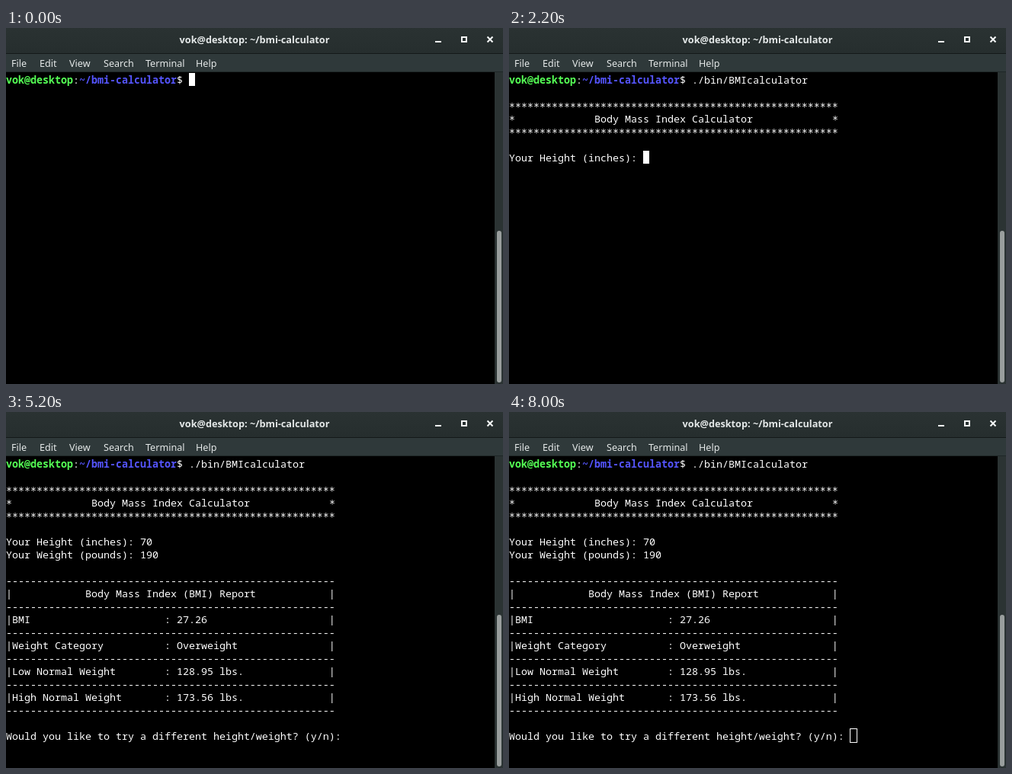
These frames come from a looping animation (652 px wide and 467 px high, 8.2 s). An HTML page:

```html
<!DOCTYPE html>
<html lang="en">
<head>
<meta charset="utf-8">
<title>Terminal</title>
<style>
  html, body { margin: 0; width: 100%; height: 100%; overflow: hidden; background: #000; }
  svg { display: block; width: 652px; height: 467px; }
  text { white-space: pre; fill: #fff; }
  .ui text { font: 12.6px "Noto Sans", "Open Sans", sans-serif; fill: #e4e8e8; }
  .ui .title { font-size: 12.7px; font-weight: 700; text-anchor: middle; }
  .term text { font: 13.333px "Noto Sans Mono", "DejaVu Sans Mono", monospace; }
  .term .bold { font-weight: 700; }
  .term .stars { font-family: "DejaVu Sans Mono", monospace; font-size: 13.29px; }
</style>
</head>
<body>
<svg viewBox="0 0 652 467">
  <defs>
    <linearGradient id="bar" x2="0" y2="1">
      <stop stop-color="#2a3232"/>
      <stop offset="1" stop-color="#262e2e"/>
    </linearGradient>
  </defs>
  <rect width="652" height="467"/>
  <g class="ui">
    <rect width="652" height="33" fill="url(#bar)"/>
    <rect y="33" width="652" height="1" fill="#141919"/>
    <rect y="34" width="652" height="23" fill="#2f393a"/>
    <rect y="57" width="652" height="1" fill="#1f2727"/>
    <text class="title" x="326" y="20">vok@desktop: ~/bmi-calculator</text>
    <g id="menu"></g>
    <g fill="none" stroke="#f4f6f6" stroke-width="2">
      <path d="M563 18H571"/>
      <rect x="598" y="12" width="6" height="6"/>
      <path d="M631.5 11.5l7 7M638.5 11.5l-7 7"/>
    </g>
    <rect x="641" y="58" width="11" height="409" fill="#2b3333"/>
    <rect x="644" y="266" width="6" height="199" rx="3" fill="#999e9d"/>
  </g>
  <g class="term">
    <g id="rows"></g>
    <rect id="cursor"/>
  </g>
</svg>
<script>
const LOOP = 8200, STEP = 200;
const CELL = 8, LINE = 17, TOP = 59, BASE = 73, COLS = 54;
const RUN = 1800, WEIGHT = 2800, REPORT = 3600, UNFOCUS = 7600;
const BLINK = 600, BLINK_START = 4000;

const COMMAND = './bin/BMIcalculator';
const QUESTION = 'Would you like to try a different height/weight? (y/n): ';
const PROMPT = [
  ['vok@desktop', '#55ff55', true],
  [':', '#fff'],
  ['~/bmi-calculator', '#5555ff', true],
  ['$ ', '#fff']
];
const promptLength = PROMPT.reduce((n, [text]) => n + text.length, 0);

const byId = id => document.getElementById(id);
const rows = byId('rows'), cursor = byId('cursor');

function add(parent, tag, attrs, text = '') {
  const node = document.createElementNS('http://www.w3.org/2000/svg', tag);
  for (const name in attrs) node.setAttribute(name, attrs[name]);
  node.textContent = text;
  return parent.appendChild(node);
}

const MENU = { File: 7, Edit: 44, View: 83, Search: 128, Terminal: 183, Help: 249 };
for (const label in MENU) add(byId('menu'), 'text', { x: MENU[label], y: 51 }, label);

const framed = (edge, col, text) => (edge + ' '.repeat(col - 1) + text).padEnd(COLS - 1) + edge;
const field = (name, value) => framed('|', 1, name.padEnd(25) + ': ' + value);

function reportLines() {
  const rule = '-'.repeat(COLS);
  const body = [
    framed('|', 13, 'Body Mass Index (BMI) Report'),
    field('BMI', '27.26'),
    field('Weight Category', 'Overweight'),
    field('Low Normal Weight', '128.95 lbs.'),
    field('High Normal Weight', '173.56 lbs.')
  ];
  return ['', rule, ...body.flatMap(line => [line, rule]), '', QUESTION];
}

// One character per step, the first one at the given time.
const typed = (text, t, start) =>
  text.slice(0, Math.max(0, Math.floor((t - start) / STEP) + 1));

function screenLines(t) {
  const count = Math.round(COMMAND.length * Math.min(1, t / 1600));
  const lines = [COMMAND.slice(0, count)];
  if (t >= RUN) {
    const stars = '*'.repeat(COLS);
    lines.push('', stars, framed('*', 14, 'Body Mass Index Calculator'), stars, '',
      'Your Height (inches): ' + typed('70', t, 2400));
  }
  if (t >= WEIGHT) lines.push('Your Weight (pounds): ' + typed('190', t, 3000));
  if (t >= REPORT) lines.push(...reportLines());
  return lines;
}

function drawLine(text, row, startCol) {
  // Asterisks use a larger glyph, centred on the line.
  for (const run of text.matchAll(/\*+|[^*]+/g)) {
    const stars = run[0][0] === '*';
    add(rows, 'text', {
      x: (startCol + run.index) * CELL,
      y: BASE + row * LINE + (stars ? 0.7 : 0),
      class: stars ? 'stars' : ''
    }, run[0]);
  }
}

function drawPrompt() {
  let col = 0;
  for (const [text, color, bold] of PROMPT) {
    add(rows, 'text', {
      x: col * CELL, y: BASE, style: 'fill:' + color, class: bold ? 'bold' : ''
    }, text);
    col += text.length;
  }
}

function drawCursor(t, row, col) {
  const hollow = t >= UNFOCUS;
  const phase = Math.floor((t - BLINK_START) / BLINK);
  const hidden = !hollow && t >= BLINK_START && phase % 2 === 0;
  const grow = hollow ? 0.5 : 0;
  const attrs = {
    x: col * CELL - grow,
    y: TOP + row * LINE - grow,
    width: CELL + 2 * grow,
    height: LINE + 2 * grow,
    fill: hollow ? 'none' : '#fff',
    stroke: hollow ? '#fff' : 'none',
    visibility: hidden ? 'hidden' : 'visible'
  };
  for (const name in attrs) cursor.setAttribute(name, attrs[name]);
}

function render(t) {
  rows.replaceChildren();
  drawPrompt();
  const lines = screenLines(t);
  lines.forEach((line, row) => drawLine(line, row, row ? 0 : promptLength));
  const last = lines.length - 1;
  drawCursor(t, last, lines[last].length + (last ? 0 : promptLength));
}

const start = performance.now();
let shown = -1;
function tick() {
  const elapsed = (performance.now() - start) % LOOP;
  const t = Math.floor(elapsed / STEP) * STEP;
  if (t !== shown) render(shown = t);
  requestAnimationFrame(tick);
}
tick();
</script>
</body>
</html>
```
